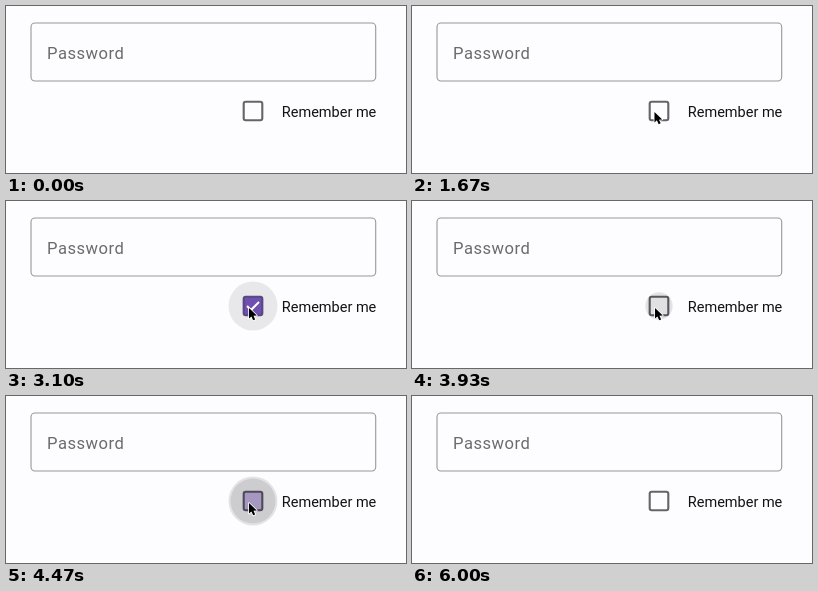
Write an HTML page with a canvas that moves like this. It is 400x167 px and loops after 7.06 s.

```html
<!DOCTYPE html>
<html lang="en">
<head>
<meta charset="utf-8">
<title>Remember me</title>
<style>
  html, body { margin: 0; width: 100%; height: 100%; overflow: hidden; background: #fdfcfe; }
  canvas { display: block; width: 400px; height: 167px; }
</style>
</head>
<body>
<canvas id="stage"></canvas>
<script>
const W = 400, H = 167, LOOP = 7060;
const BOX = { x: 247, y: 105, half: 9.3 };
const canvas = document.getElementById('stage');
const ctx = canvas.getContext('2d');
const dpr = window.devicePixelRatio || 1;
canvas.width = W * dpr;
canvas.height = H * dpr;

// press: ripple start, check: fill start, fade: ripple release, rest: alpha left after the fade
const clicks = [
  { press: 2520, check: 2850, fade: 2920, end: 3240, uncheck: 3330, rest: 0 },
  { press: 3900, check: 4450, fade: 4540, end: 4900, uncheck: 4925, rest: 0.035 }
];

// time, x, y of the pointer tip
const enter = [[1270, 251, 155], [1400, 250, 138], [1510, 245, 114], [1590, 241, 103], [1700, 243, 107]];
const leave = [[5665, 243, 107], [5730, 243, 109], [5850, 243, 109], [5900, 254, 96], [5990, 297, 47]];

const clamp = v => Math.max(0, Math.min(1, v));
const span = (t, a, b) => clamp((t - a) / (b - a));
const mix = (a, b, k) => a + (b - a) * k;
const easeOut = (k, power) => 1 - Math.pow(1 - k, power);

function along(path, t) {
  let i = 0;
  while (i < path.length - 2 && t > path[i + 1][0]) i++;
  const [t0, x0, y0] = path[i], [t1, x1, y1] = path[i + 1];
  const k = span(t, t0, t1);
  return [mix(x0, x1, k), mix(y0, y1, k)];
}

function text(str, x, y, size, color, spacing) {
  ctx.font = `${size}px Roboto, Arial, sans-serif`;
  ctx.letterSpacing = spacing + 'px';
  ctx.fillStyle = color;
  ctx.fillText(str, x, y);
}

function disc(r, alpha) {
  ctx.fillStyle = `rgba(0,0,0,${alpha})`;
  ctx.beginPath();
  ctx.arc(BOX.x, BOX.y, r, 0, Math.PI * 2);
  ctx.fill();
}

function drawField() {
  ctx.strokeStyle = '#98979a';
  ctx.lineWidth = 1.1;
  ctx.beginPath();
  ctx.roundRect(25, 17, 344.7, 58, 4);
  ctx.stroke();
  text('Password', 41, 53, 16.6, '#6c6a6e', 0.5);
  text('Remember me', 275.8, 110.8, 14.5, '#121114', 0);
}

function drawRipple(t, click) {
  const grow = easeOut(span(t, click.press, click.press + 450), 5);
  const gain = mix(0.1, 0.19, span(t, click.press, click.press + 300));
  const alpha = mix(gain, click.rest, span(t, click.fade, click.end));
  const r = 9 + 15.5 * grow;
  if (alpha < 0.002) return 0;
  const rim = Math.min(alpha, 0.1);
  disc(r, rim);
  if (alpha > rim) disc(r - 2, (alpha - rim) / (1 - rim));
  return alpha;
}

function drawTick(k) {
  if (k <= 0) return;
  const { x, y } = BOX;
  const mid = clamp(k / 0.35), tail = clamp((k - 0.35) / 0.65);
  ctx.strokeStyle = '#fff';
  ctx.lineWidth = 2;
  ctx.beginPath();
  ctx.moveTo(x - 6, y);
  ctx.lineTo(x - 6 + 4 * mid, y + 4 * mid);
  if (tail) ctx.lineTo(x - 2 + 8 * tail, y + 4 - 8 * tail);
  ctx.stroke();
}

function drawBox(fill, tick, shade) {
  const { x, y, half } = BOX;
  ctx.beginPath();
  ctx.roundRect(x - half, y - half, half * 2, half * 2, 2);
  ctx.fillStyle = `rgba(111,79,176,${fill})`;
  ctx.fill();
  const tint = [[102, 98], [100, 80], [107, 145]]
    .map(([off, on]) => Math.round(mix(off, on, fill * fill) * (1 - shade * 1.2)));
  ctx.strokeStyle = `rgb(${tint})`;
  ctx.lineWidth = 2.1;
  ctx.stroke();
  drawTick(tick);
}

function drawPointer([x, y]) {
  ctx.save();
  ctx.translate(x, y);
  ctx.beginPath();
  ctx.moveTo(0, 0);
  for (const [px, py] of [[0, 10.6], [2.4, 8.4], [4.2, 12.3], [6.2, 11.4], [4.5, 7.7], [7.8, 7.6]]) ctx.lineTo(px, py);
  ctx.closePath();
  ctx.lineJoin = 'round';
  ctx.strokeStyle = '#fff';
  ctx.lineWidth = 1.6;
  ctx.stroke();
  ctx.fillStyle = '#000';
  ctx.fill();
  ctx.restore();
}

function draw(t) {
  ctx.setTransform(dpr, 0, 0, dpr, 0, 0);
  ctx.fillStyle = '#fdfcfe';
  ctx.fillRect(0, 0, W, H);
  drawField();

  let fill = 0, tick = 0, shade = 0;
  const click = t < clicks[1].press ? clicks[0] : clicks[1];
  if (t >= click.press && t < 5900) {
    shade = drawRipple(t, click);
    const off = span(t, click.uncheck, click.uncheck + 70);
    fill = span(t, click.check, click.check + 50) * (1 - off);
    tick = off > 0 ? 0 : span(t, click.check + 50, click.check + 170);
  }
  drawBox(fill, tick, shade);

  if (t >= 1270 && t < 5995) drawPointer(along(t < 3000 ? enter : leave, t));
}

const start = performance.now();
function frame() {
  draw((performance.now() - start) % LOOP);
  requestAnimationFrame(frame);
}
frame();
</script>
</body>
</html>
```
